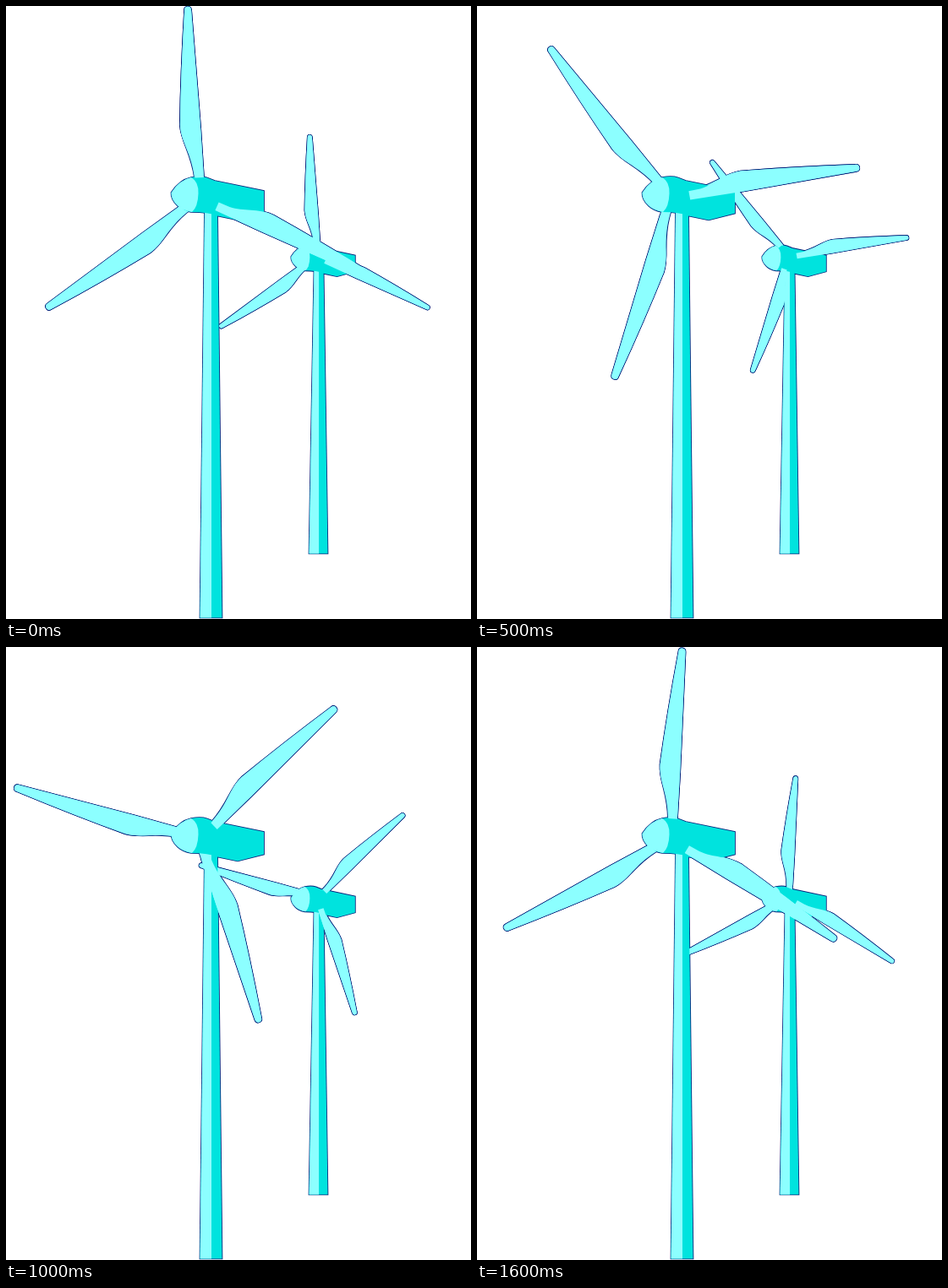
An HTML page with a canvas that plays this animation: 550x726 px, repeating every 1.7 s.

```html
<!DOCTYPE html>
<html lang="en">
<head>
<meta charset="utf-8">
<title>Wind turbines</title>
<style>
html, body { margin: 0; overflow: hidden; background: #fff; }
canvas { display: block; }
</style>
</head>
<body>
<canvas width="550" height="726"></canvas>
<script>
const ctx = document.querySelector('canvas').getContext('2d');
const LIGHT = '#8cffff', DARK = '#00e3de', LINE = '#00207a';
const LOOP = 1700, STEP = 100, RAD = Math.PI / 180;

const hub = new Path2D('M219 203Q231 201 238 203.5L247 207L305 219V245.5L274 253.5L250 248.5Q240 244 219 244Q209 242 203 236.5Q195 229 195.5 221Q205 206 219 203Z');
const nose = new Path2D('M219 203Q228 208 227.5 222Q227 238 220 244Q209 242 203 236.5Q195 229 195.5 221Q205 206 219 203Z');

// Blade pointing right, pivot at 0,0
const blade = root => new Path2D(
  `M${root} 6L80 6L222 4Q226.5 4 226.5 0Q226.5 -4 222 -4` +
  `Q150 -13 87 -18C66 -18 54 -7 ${Math.min(root + 14, 36)} -5L${root} -4.5Z`);

const far = {
  x: 368.5, y: 297, scale: .637, inset: 9,
  hub: [.69, 0, 0, .715, 202.4, 138.9],
  tower: new Path2D('M364.5 308L358.5 648.5H380.5L375.5 308Z'),
  face: new Path2D('M364.5 308L358.5 648.5H370V308Z')
};
const near = {
  x: 229.5, y: 227.2, scale: 1, inset: 2,
  hub: [1, 0, 0, 1, 0, 0],
  tower: new Path2D('M235 238L229.5 724.5H255.5L250 238Z'),
  face: new Path2D('M235 238L229.5 724.5H243V238Z')
};

let outlining;
function paint(path, colour, scale = 1) {
  if (outlining) {
    ctx.strokeStyle = LINE;
    ctx.lineWidth = 1.7 / scale;
    ctx.stroke(path);
  } else {
    ctx.fillStyle = colour;
    ctx.fill(path);
  }
}

function drawRotor(t, turn, behind) {
  for (let i = 0; i < 3; i++) {
    const a = turn + i * 120 * RAD;
    const root = behind ? 10 : 24 - t.inset * Math.max(0, Math.cos(a));
    ctx.save();
    ctx.translate(t.x, t.y);
    ctx.transform(t.scale, .024 * t.scale, 0, t.scale, 0, 0);
    ctx.rotate(.033 * Math.sin(a) - a); // slight perspective
    paint(blade(root), LIGHT, t.scale);
    ctx.restore();
  }
}

function drawTurbine(t, turn) {
  paint(t.tower, DARK);
  if (!outlining) paint(t.face, LIGHT);
  drawRotor(t, turn, true);
  ctx.save();
  ctx.transform(...t.hub);
  paint(hub, DARK, t.hub[0]);
  if (!outlining) paint(nose, LIGHT);
  ctx.restore();
  drawRotor(t, turn, false);
}

function frame() {
  const step = Math.floor(performance.now() % LOOP / STEP);
  const turn = (95.6 + step * 120 * STEP / LOOP) * RAD;
  ctx.clearRect(0, 0, 550, 726);
  // Lines first, fills over them: only the joint silhouette keeps its outline
  for (outlining of [true, false]) {
    drawTurbine(far, turn);
    drawTurbine(near, turn);
  }
  requestAnimationFrame(frame);
}
frame();
</script>
</body>
</html>
```
